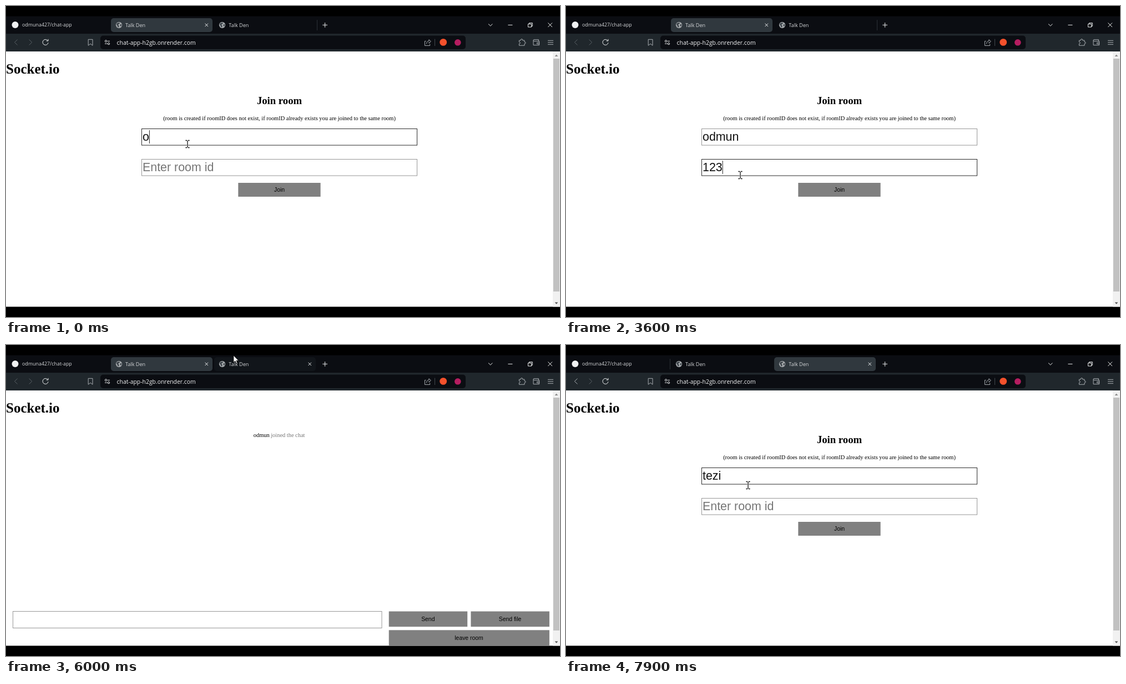
An HTML page that plays this animation: 998x561 px, repeating every 8 s.

```html
<!DOCTYPE html>
<html lang="en">
<head>
<meta charset="utf-8">
<title>Join room</title>
<style>
html, body { margin: 0; width: 100%; height: 100%; overflow: hidden; background: #000; }
svg { display: block; width: 100vw; height: 100vh; }
text { white-space: pre; }
.ui { font-family: "Open Sans", "Noto Sans", sans-serif; font-size: 9.1px; fill: #d4d6d8; }
.url { font-size: 10.4px; fill: #f2f3f4; }
.serif { font-family: "Liberation Serif", "Times New Roman", serif; font-size: 10.42px; }
.sans { font-family: "Liberation Sans", Arial, sans-serif; font-size: 10.4px; }
.mid { text-anchor: middle; }
.field { font-size: 21.4px; }
.box { fill: #fff; stroke: #979797; }
.box.focus { stroke: #2b2b2b; }
.line { fill: none; stroke: #a9aeb2; stroke-width: 1; }
.bright { stroke: #eceeef; }
.dim { stroke: #596065; }
.btn { fill: #808080; }
</style>
</head>
<body>
<svg viewBox="0 0 998 561" preserveAspectRatio="none">
  <defs>
    <g id="globe">
      <circle r="5.6" fill="#a5a9ac"/>
      <path d="M-4-3.2Q-1.5-3.8 0-4.6L1.8-3.3 0-1.6-1.6-.6-.2 1 .2 2.6-1 4.4-2.8 2.4-3.2.4-4.6-.6ZM2.6-1.2 4.6-1.6 4.8.8 3 2.6 1.8.8Z" fill="#3d444a"/>
    </g>
    <path id="cross" class="line bright" d="M-2.7-2.7 2.7 2.7M2.7-2.7-2.7 2.7"/>
  </defs>

  <!-- tab strip -->
  <rect y="18.5" width="998" height="32" fill="#0b0d12"/>
  <rect id="hoverTab" x="375" y="22" width="183" height="25" rx="5" fill="#11151a"/>
  <rect id="activeTab" y="22" width="183" height="25" rx="5" fill="#30383e"/>
  <path id="divider" class="line" stroke-width=".8" style="stroke:#2b3036"/>
  <circle cx="16.5" cy="34" r="6" fill="#f0f1f2"/>
  <text class="ui" style="font-size:8.9px" x="29" y="37.4">odmuna427/chat-app</text>
  <use href="#globe" x="203.5" y="34.3"/>
  <text class="ui" x="215" y="37.6">Talk Den</text>
  <use id="close1" href="#cross" x="361.3" y="34.3"/>
  <use href="#globe" x="389.5" y="34.3"/>
  <text class="ui" x="401.3" y="37.6">Talk Den</text>
  <use id="close2" href="#cross" x="547.3" y="34.3"/>
  <path class="line bright" d="M570.3 34.3H579M574.6 30V38.7M869 32.4 872.7 36 876.4 32.4M904.4 34.3H912.4M976.4 30.4 984 38M984 30.4 976.4 38M940.5 32.5H946.5V38H940.5ZM942.4 32.2V30.6H948.3V36.3H946.8"/>

  <!-- toolbar -->
  <rect y="50" width="998" height="32" fill="#20272c"/>
  <rect x="170" y="53.5" width="658" height="24.5" rx="5" fill="#0b0d12"/>
  <path id="back" class="line" d="M20.6 60.6 15.4 65.5 20.6 70.4"/>
  <path class="line dim" d="M41.6 60.6 46.8 65.5 41.6 70.4"/>
  <path class="line bright" d="M75.2 62.6A5 5 0 1 0 76 66.2M76 59.8V63H72.6"/>
  <path class="line" d="M148.2 60.3H156V71.2L152.1 68.2 148.2 71.2Z"/>
  <g class="line bright">
    <circle cx="180" cy="63.4" r="1.7"/><circle cx="185" cy="68" r="1.7"/>
    <path d="M182.7 63.4H187M178 68H182.4"/>
  </g>
  <text class="ui url" x="199.6" y="69.6">chat-app-h2gb.onrender.com</text>
  <path class="line" d="M756.6 63.4H754.4V71.4H763.6V68.6M757.6 68.4Q757.8 63.2 762 63V60.6L765.4 64 762 67.2V65"/>
  <path class="line" d="M772.5 59.5V72" style="stroke:#41474c"/>
  <circle cx="787.7" cy="65.4" r="6.4" fill="#f4512c"/>
  <circle cx="813.8" cy="65.8" r="5.8" fill="#b51d60"/>
  <path class="line" d="M924.4 62H927.4Q927 59.5 929 59.5T930.6 62H934V65Q936.2 64.6 936.2 66.4T934 68V71.2H924.4V68Q926.4 68 926.4 66.5T924.4 65Z"/>
  <path class="line" d="M950 62.4V70.6H960.6V63.4H951Q950 63.4 950 62T951 60.6H959.4V63.4M956.6 66H960.6V68.4H956.6Z"/>
  <path class="line" d="M976 62.3H986M976 65.8H986M976 69.3H986"/>

  <!-- page -->
  <rect y="82" width="998" height="460.5" fill="#fff"/>
  <rect x="985" y="82" width="13" height="460.5" fill="#f1f1f1"/>
  <rect x="986" y="95" width="11" height="420" fill="#c1c1c1"/>
  <path d="M988.6 91 991.5 87.6 994.4 91Z" fill="#8b8b8b"/>
  <path d="M988.6 534.4 991.5 537.8 994.4 534.4Z" fill="#505050"/>
  <text class="serif" x="0" y="122" font-size="25" font-weight="bold" style="font-size:25px">Socket.io</text>

  <g id="form">
    <text class="serif mid" x="492.5" y="177" font-weight="bold" style="font-size:18.7px">Join room</text>
    <text class="serif mid" x="492.5" y="206.3">(room is created if roomID does not exist, if roomID already exists you are joined to the same room)</text>
    <rect id="nameBox" class="box" x="244.5" y="221.5" width="496" height="29.6"/>
    <text id="nameText" class="sans field" x="246" y="243.3"/>
    <rect id="roomBox" class="box" x="244.5" y="276.5" width="496" height="29.6"/>
    <text id="roomText" class="sans field" x="246" y="298.3"/>
    <rect id="caret" width="1" height="24" fill="#222"/>
    <rect class="btn" x="418.3" y="319" width="148.3" height="25"/>
    <text class="sans mid" x="492.6" y="334.6">Join</text>
  </g>

  <g id="chat">
    <g id="joined">
      <text class="serif" x="474.7" y="166" text-anchor="end">odmun</text>
      <text class="serif" x="477.2" y="166" fill="#777">joined the chat</text>
    </g>
    <rect class="box" x="12.5" y="480.5" width="664.5" height="30"/>
    <rect class="btn" x="689.7" y="480.5" width="141.5" height="27.7"/>
    <rect class="btn" x="837.4" y="480.5" width="141.5" height="27.7"/>
    <rect class="btn" x="689.7" y="514.3" width="289.2" height="28"/>
    <text class="sans mid" x="760.3" y="497.8">Send</text>
    <text class="sans mid" x="908" y="497.8">Send file</text>
    <text class="sans mid" x="834" y="531.6">leave room</text>
  </g>

  <g id="pointer">
    <g id="beam" fill="none">
      <path d="M-3.6-6.5H3.6M-3.6 6.5H3.6M0-6.5V6.5" stroke="#fff" stroke-width="2.6"/>
      <path d="M-3.6-6.5H-.8M.8-6.5H3.6M-3.6 6.5H-.8M.8 6.5H3.6M0-6V6" stroke="#111" stroke-width="1.3"/>
    </g>
    <path id="hand" fill="#fff" stroke="#222" stroke-width=".8" stroke-linejoin="round"
      d="M-1.4.8Q0-.8 1.2.8V5L3.2 5.2 5.2 5.8 7 6.6Q8 7.2 7.8 8.6L6.6 12.6V15.4H-.4V14L-3.8 9.8Q-4.8 8.2-3.4 7.8L-1.4 9.4Z"/>
    <path id="arrow" fill="#fff" stroke="#111" stroke-width=".7" d="M0 0V12.4L2.9 9.8 4.8 14 6.7 13.1 4.9 9.1H8.8Z"/>
  </g>
</svg>
<script>
const LOOP = 8000, STEP = 100, BLINK = 500;
const el = Object.fromEntries([...document.querySelectorAll('[id]')].map(e => [e.id, e]));

// [time, characters typed]
const firstName = [[0, 1], [100, 2], [300, 3], [500, 5]];
const roomId = [[0, 0], [3400, 1], [3500, 2], [3600, 3], [3700, 4], [3800, 6], [3900, 8], [4000, 10]];
const secondName = [[0, 0], [7100, 1], [7200, 2], [7300, 3], [7400, 4]];
const focus = [[0, 'name'], [1100, 'room'], [5200, ''], [6800, 'name']];
const cursor = [[0, 'beam'], [4700, 'hand'], [5400, 'arrow'], [6500, 'beam']];
// [time, x, y] of the pointer's hot spot
const path = [
  [0, 327, 249], [700, 327, 249], [1100, 297, 296], [1300, 293, 302], [2000, 293, 302],
  [2700, 306, 302], [2800, 306, 302], [3200, 314, 305], [4600, 314, 305], [4700, 450, 324],
  [4900, 450, 324], [5000, 476, 324], [5800, 476, 324], [5900, 430, 90], [6000, 410, 19],
  [6200, 410, 19], [6300, 402, 60], [6500, 350, 215], [6600, 338, 237], [7400, 338, 237], [7900, 328, 253]
];
const edits = [firstName, focus, roomId, secondName].flat().map(k => k[0]);

const at = (keys, t) => keys.findLast(k => k[0] <= t)[1];
const show = (e, on) => e.setAttribute('visibility', on ? 'inherit' : 'hidden');

function position(t) {
  const i = path.findLastIndex(k => k[0] <= t);
  const [t0, x0, y0] = path[i], [t1, x1, y1] = path[i + 1] || [LOOP, x0, y0];
  const p = (t - t0) / (t1 - t0);
  return [x0 + (x1 - x0) * p, y0 + (y1 - y0) * p];
}

function fill(id, value, hint) {
  el[id].textContent = value || hint;
  el[id].setAttribute('fill', value ? '#111' : '#757575');
}

function render(t) {
  const second = t >= 6200, inChat = t >= 5400 && !second, hover = t >= 6000 && !second;

  el.activeTab.setAttribute('x', second ? 375 : 189);
  el.divider.setAttribute('d', second ? 'M187.5 25V44' : 'M560.5 25V44');
  show(el.divider, !hover);
  show(el.hoverTab, hover);
  show(el.close1, !second);
  show(el.close2, second || hover);
  el.back.setAttribute('class', 'line ' + (second ? '' : 'dim'));

  show(el.form, !inChat);
  show(el.chat, inChat);
  show(el.joined, t >= 5500);

  const name = second ? 'tezi'.slice(0, at(secondName, t)) : 'odmun'.slice(0, at(firstName, t));
  const room = second ? '' : '1234567890'.slice(0, at(roomId, t));
  fill('nameText', name, 'Enter your name');
  fill('roomText', room, 'Enter room id');

  const active = at(focus, t);
  for (const id of ['name', 'room']) el[id + 'Box'].classList.toggle('focus', id === active);
  const idle = t - Math.max(...edits.filter(e => e <= t));
  show(el.caret, active && Math.floor(idle / BLINK) % 2 === 0);
  if (active) {
    const typed = active === 'name' ? name : room;
    const width = typed ? el[active + 'Text'].getComputedTextLength() : 0;
    el.caret.setAttribute('x', 246 + width);
    el.caret.setAttribute('y', active === 'name' ? 224 : 279);
  }

  el.pointer.setAttribute('transform', `translate(${position(t)})`);
  for (const id of ['beam', 'hand', 'arrow']) show(el[id], id === at(cursor, t));
}

function tick() {
  render(Math.floor(performance.now() % LOOP / STEP) * STEP);
  requestAnimationFrame(tick);
}
tick();
</script>
</body>
</html>
```
